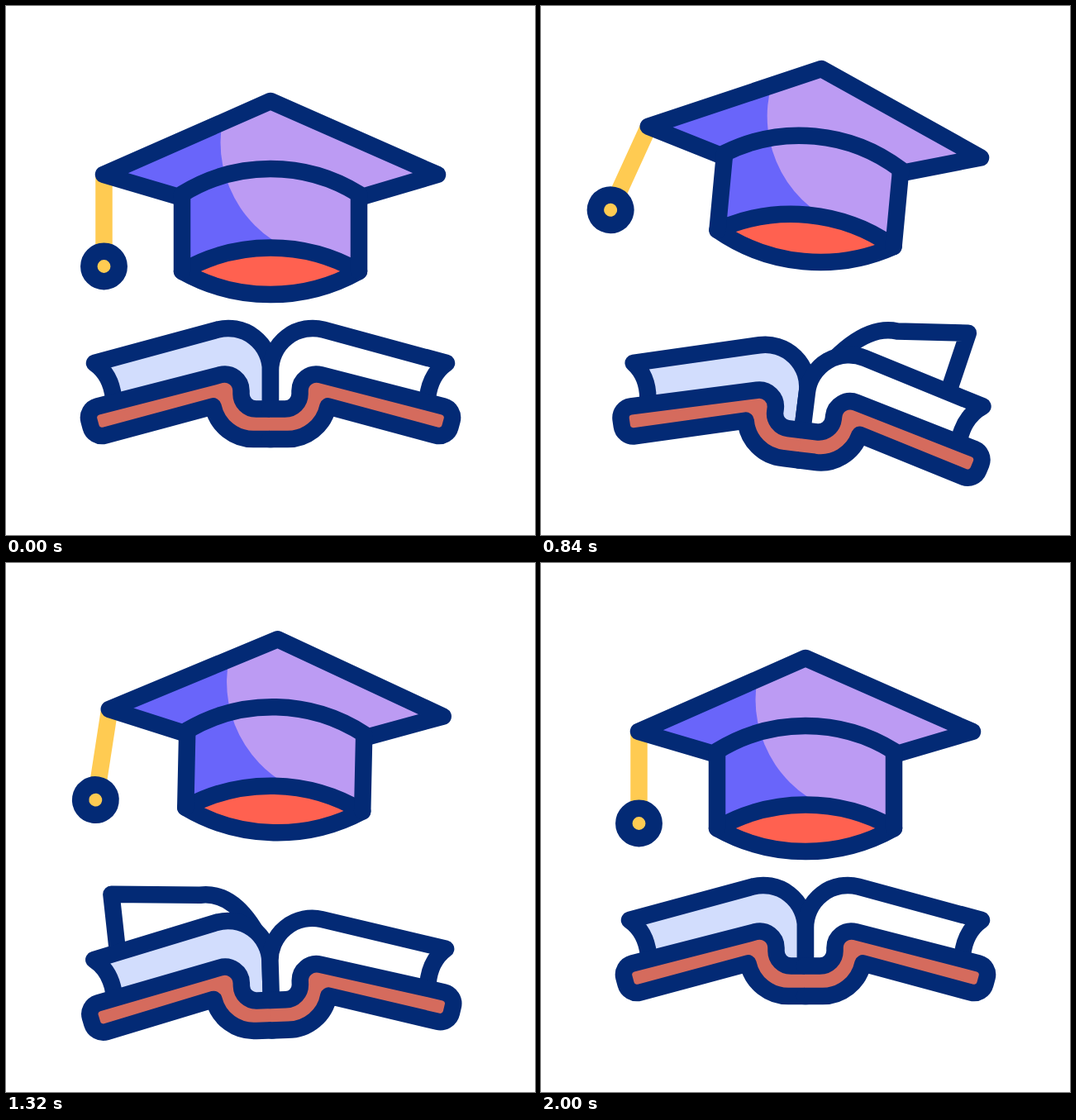
Recreate the animation shown at these times as an HTML page. Size 640x640 px, loop 2200 ms.

```html
<!DOCTYPE html>
<html lang="en">
<head>
<meta charset="utf-8">
<title>Graduation cap and book</title>
<style>
  html, body { margin: 0; height: 100%; overflow: hidden; background: #fff; }
  svg { display: block; width: 100vw; height: 100vh; }
  .line { stroke: #032a75; stroke-width: 20.5; stroke-linecap: round; stroke-linejoin: round; }
</style>
</head>
<body>
<svg viewBox="0 0 640 640">
  <defs>
    <path id="board" d="M213 232L118 204L320 115L522 204L427 232"/>
    <path id="crown" d="M213 321V227.5A203 203 0 0 1 427 227.5V321"/>
    <path id="block" d="M320 487V441A51 51 0 0 0 255.8 391.7L107 432Q127 446 130 474"/>
    <path id="cover" d="M321 487.5H302.5A18 18 0 0 1 284.5 469.5V465.5A20 20 0 0 0 259.3 446.2L110.3 484.5A14 14 0 0 0 100.4 501.5L102.6 509.6A14 14 0 0 0 119.7 519.6L250.5 484.4A50 50 0 0 0 301 524H321"/>
    <clipPath id="capShape">
      <use href="#board"/>
      <use href="#crown"/>
    </clipPath>
  </defs>

  <g id="book" class="line">
    <path class="page" fill="#fff"/>
    <path class="page" fill="#fff"/>
    <use href="#block" fill="#d2ddfd"/>
    <use href="#block" fill="#fff" transform="matrix(-1 0 0 1 640 0)"/>
    <use href="#cover" fill="#d56b5d"/>
    <use href="#cover" fill="#d56b5d" transform="matrix(-1 0 0 1 640 0)"/>
  </g>

  <g id="cap">
    <g id="tassel">
      <path d="M118.5 204V300" stroke="#ffcb52" stroke-width="20.5"/>
      <circle class="line" cx="118.5" cy="315" r="18.2" fill="#ffcb52"/>
    </g>
    <g clip-path="url(#capShape)">
      <path d="M100 100H540V340H100Z" fill="#6965fa"/>
      <circle cx="401.5" cy="165" r="142" fill="#bc9bf3"/>
    </g>
    <g class="line" fill="none">
      <use href="#board"/>
      <path d="M213 321A215 215 0 0 1 427 321A218 218 0 0 1 213 321Z" fill="#ff6150"/>
      <use href="#crown"/>
    </g>
  </g>
</svg>

<script>
const LOOP = 2200, STEP = 40, FLIP = 457;
const { PI, sin, cos, min, max, floor } = Math;
const byId = id => document.getElementById(id);
const pages = document.querySelectorAll('.page');

// Sine ease from 0 to 1 between two times.
const ease = (t, from, to) => (1 - cos(PI * min(1, max(0, (t - from) / (to - from))))) / 2;

// Eases through one value per beat, starting and ending at rest.
const sway = (t, beats, ...values) =>
  values.reduce((sum, v, i) => sum + (v - (values[i - 1] || 0)) * ease(t, beats[i], beats[i + 1]), 0);

// Crouch, leap, landing and settling.
const capBeats = [240, 540, 1040, 1560, 2000];
const bookBeats = [540, 780, 1280, 1520, 2000];

function place(id, x, y, turn, px, py) {
  byId(id).setAttribute('transform', `translate(${x} ${y}) rotate(${turn} ${px} ${py})`);
}

// A page swings from right (u = 0) to left (u = 1) around the spine.
function drawPage(page, u) {
  page.style.display = u > 0 && u < 1 ? '' : 'none';
  const c = cos(PI * u), s = sin(PI * u);
  const bend = [320 + 16 * s + 95 * s * c, 376 - 14 * s - 100 * (s * c) ** 2];
  const knee = [320 + 64 * c + 14 * s + 170 * s * s * c, 392 - 75 * s];
  const corner = [320 + 213 * c, 432 - 172 * s];
  const foot = [320 + 202 * c - 45 * s ** 3, 455 - 69 * s];
  page.setAttribute('d', `M320 441Q${bend} ${knee}L${corner}L${foot}`);
}

function draw(t) {
  place('cap',
    sway(t, capBeats, 0, 12.7, 1, 0),
    sway(t, capBeats, 29.5, -76, 19, 0),
    sway(t, capBeats, -4.8, 10.7, -6.2, 0), 320, 232);
  place('tassel', 0, 0, sway(t, capBeats, -9.7, 34.5, -13.6, 0), 118.5, 204);
  place('book', 0, 51 * (ease(t, 615, 1060) - ease(t, 1160, 1720)),
    sway(t, bookBeats, 7.4, -2, 1.4, 0), 320, 457);
  pages.forEach((page, i) => drawPage(page, (t - 764 - 168 * i) / FLIP));
}

const start = performance.now();
function tick() {
  const t = (performance.now() - start) % LOOP;
  draw(floor(t / STEP) * STEP);
  requestAnimationFrame(tick);
}
tick();
</script>
</body>
</html>
```
